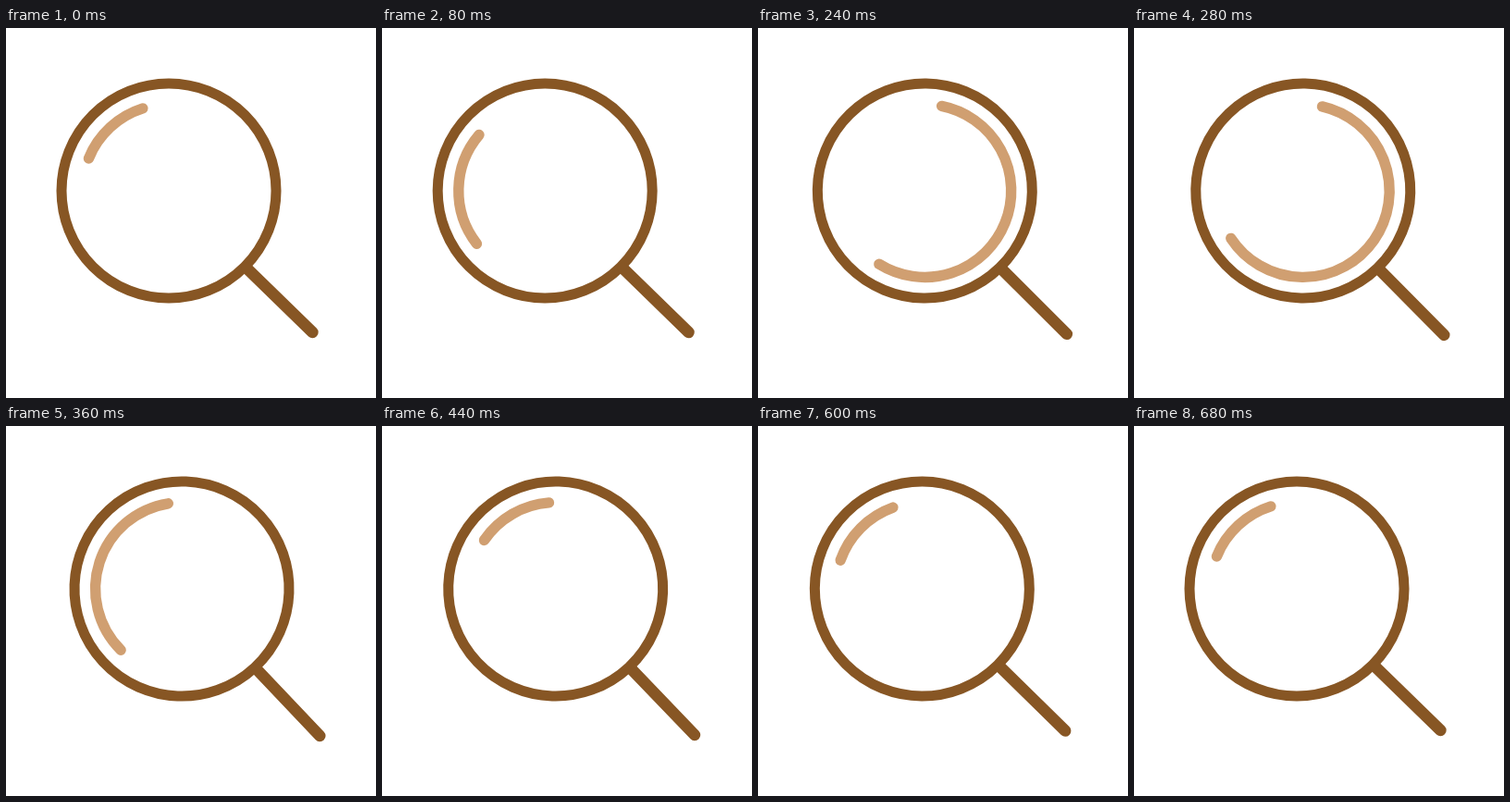
An HTML page that plays this animation: 400 by 400 pixels, repeating every 0.72 s.

```html
<!DOCTYPE html>
<html lang="en">
<head>
<meta charset="utf-8">
<title>Magnifier</title>
<style>
html, body { margin: 0; width: 100%; height: 100%; overflow: hidden; background: #fff; }
svg { display: block; width: 100vw; height: 100vh; }
</style>
</head>
<body>
<svg viewBox="0 0 400 400" fill="none" stroke="#875624" stroke-width="11" stroke-linecap="round">
  <path id="shine" stroke="#d09f71" stroke-width="11.4"/>
  <g id="lens">
    <circle r="116"/>
    <path d="M84.3 83.7L155.4 153" stroke-width="12.5"/>
  </g>
</svg>
<script>
const LOOP = 720, STEP = 40, CENTER = 176, RADIUS = 93.4;
const PEAK = 360, REST = 660, REACH = 14, TILT = 0.16;
const lens = document.getElementById("lens");
const shine = document.getElementById("shine");

const clamp = u => Math.min(1, Math.max(0, u));
const ease = u => (1 - Math.cos(Math.PI * clamp(u))) / 2;

// Speeds up to the right, then eases back to rest
function shift(t) {
  return REACH * (t < PEAK ? (t / PEAK) ** 2.9 : 1 - ease((t - PEAK) / (REST - PEAK)));
}

// Eased swing from a rest angle through turning points [time, angle] and back
function swing(rest, ...turns) {
  const stops = [...turns, [680, rest]];
  return t => {
    let time = 0, angle = rest;
    for (const [end, goal] of stops) {
      angle += (goal - angle) * ease((t - time) / (end - time));
      if (t <= end) break;
      time = end;
    }
    return angle;
  };
}

// Wind up, overshoot, settle
const tail = swing(202, [265, -85], [411, 217], [530, 197]);
const head = swing(252.5, [242, 122], [385, 272], [540, 249]);

function point(cx, deg) {
  const a = deg * Math.PI / 180;
  return `${cx + RADIUS * Math.cos(a)} ${CENTER + RADIUS * Math.sin(a)}`;
}

function draw(t) {
  const dx = shift(t), cx = CENTER + dx;
  const from = tail(t), to = head(t);
  const large = to - from > 180 ? 1 : 0;
  lens.setAttribute("transform", `translate(${cx} ${CENTER}) rotate(${dx * TILT})`);
  shine.setAttribute("d", `M${point(cx, from)}A${RADIUS} ${RADIUS} 0 ${large} 1 ${point(cx, to)}`);
}

const start = performance.now();
function tick() {
  const t = (performance.now() - start) % LOOP;
  draw(Math.floor(t / STEP) * STEP);
  requestAnimationFrame(tick);
}
tick();
</script>
</body>
</html>
```
